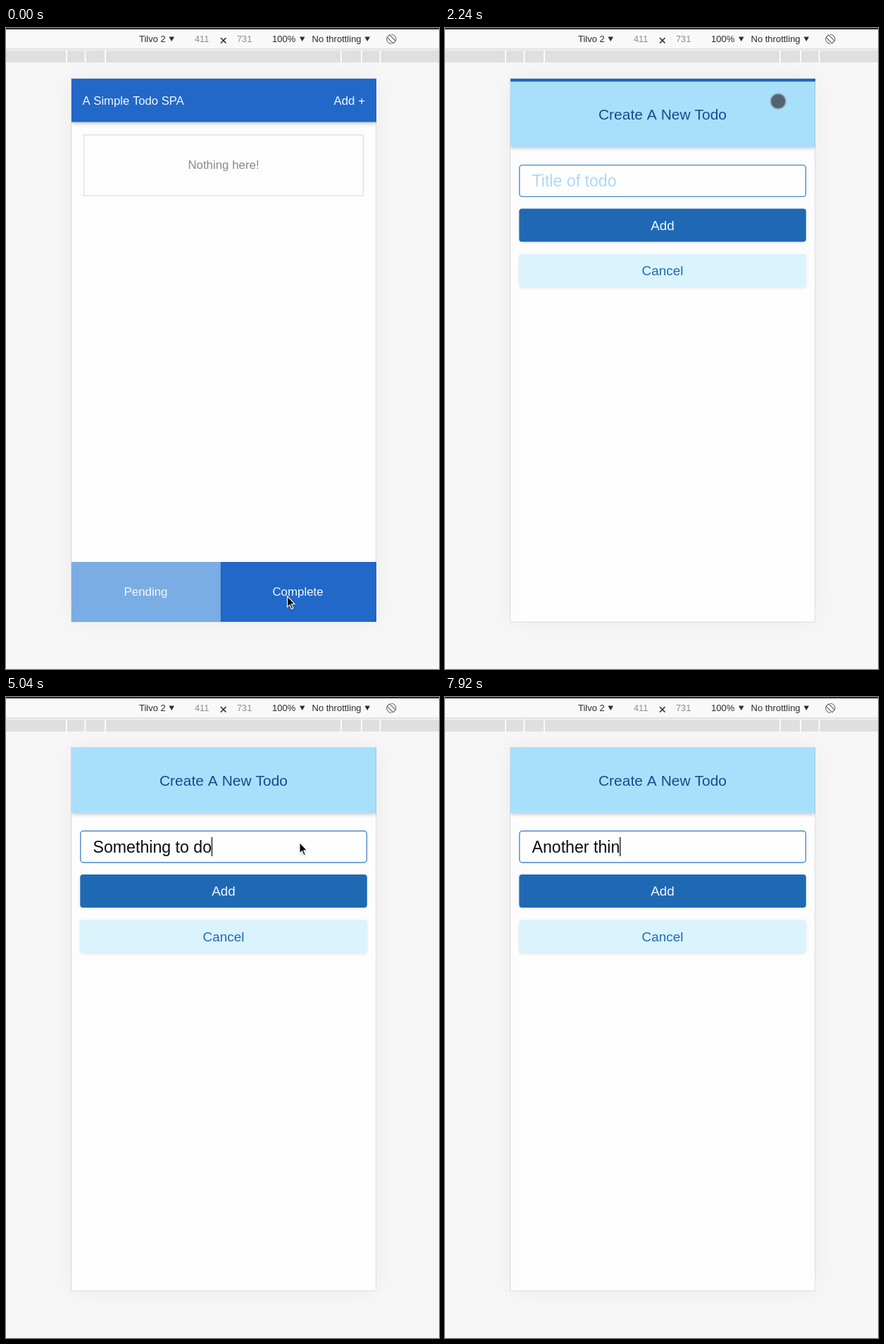
Write an HTML page with a canvas that moves like this. It is 615 px wide and 910 px high and loops after 8 s.

```html
<!DOCTYPE html>
<html lang="en">
<head>
<meta charset="utf-8">
<title>Todo app</title>
<style>
  html, body { margin: 0; width: 100%; height: 100%; overflow: hidden; background: #f7f7f7; }
  canvas { display: block; width: 615px; height: 910px; }
</style>
</head>
<body>
<canvas id="stage" width="615" height="910"></canvas>
<script>
const ctx = document.getElementById('stage').getContext('2d');
const LOOP = 8000, STEP = 80, SLIDE = 300;
const PHONE = { x: 93, y: 72, w: 433, h: 771 };
const BLUE = '#2168c8', FONT = '"Liberation Sans", Arial, sans-serif';

// CSS "ease" curve, solved by bisection
function ease(x) {
  if (x <= 0) return 0;
  if (x >= 1) return 1;
  const bez = (a, b, u) => 3 * a * u * (1 - u) ** 2 + 3 * b * u * u * (1 - u) + u ** 3;
  let lo = 0, hi = 1;
  for (let i = 0; i < 24; i++) {
    const mid = (lo + hi) / 2;
    if (bez(0.25, 0.25, mid) < x) lo = mid; else hi = mid;
  }
  return bez(0.1, 1, lo);
}
const slide = (t, start) => ease((t - start) / SLIDE);

// Key moments
const toComplete = 365, toPending = 1279;
const open1 = 1970, close1 = 5245, open2 = 6120;

const TYPED = [
  { text: 'Something to do', ready: open1 + SLIDE,
    when: i => i < 7 ? [3200, 3360, 3520, 3600, 3760, 3840, 3840][i] : 4000 + (i - 7) * 80 },
  { text: 'Another thin', ready: open2 + SLIDE,
    when: i => i ? 7120 + (i - 1) * 80 : 6880 }
];

// Pointer path: time, x, y
const PATH = [
  [360, 399.5, 806.5], [680, 300, 800], [1040, 205, 792], [1200, 212, 786],
  [1360, 325.5, 673], [1520, 490, 430], [1680, 569, 210], [1840, 530, 125],
  [2000, 473, 103], [4800, 473, 103], [5000, 425, 190], [5200, 385, 272],
  [5360, 385, 272], [5600, 425, 190], [5840, 472, 120], [6000, 487, 102.5]
];
const PRESSES = [[2000, 3120], [5200, 5360], [6080, 6800]];
const HIDDEN = [[3200, 4880], [6880, LOOP]];
const during = (spans, t) => spans.some(([a, b]) => t >= a && t < b);

function pointerAt(t) {
  let i = PATH.findIndex(p => p[0] > t);
  if (i < 0) i = PATH.length;
  if (i === 0) return PATH[0].slice(1);
  const a = PATH[i - 1], b = PATH[i] || a;
  const k = b === a ? 0 : (t - a[0]) / (b[0] - a[0]);
  return [a[1] + (b[1] - a[1]) * k, a[2] + (b[2] - a[2]) * k];
}

function rect(x, y, w, h, color) {
  ctx.fillStyle = color;
  ctx.fillRect(x, y, w, h);
}
function label(text, x, y, size, color, align = 'left') {
  ctx.font = `${size}px ${FONT}`;
  ctx.textAlign = align;
  ctx.fillStyle = color;
  ctx.fillText(text, x, y);
}
function shape(points, color) {
  ctx.beginPath();
  points.forEach(([x, y]) => ctx.lineTo(x, y));
  ctx.closePath();
  ctx.fillStyle = color;
  ctx.fill();
}
function rounded(x, y, w, h, r, fill, stroke) {
  ctx.beginPath();
  ctx.roundRect(x, y, w, h, r);
  if (fill) { ctx.fillStyle = fill; ctx.fill(); }
  if (stroke) { ctx.strokeStyle = stroke; ctx.lineWidth = 1.4; ctx.stroke(); }
}
function shadowed(blur, dy, alpha, draw) {
  ctx.save();
  ctx.shadowColor = `rgba(0,0,0,${alpha})`;
  ctx.shadowBlur = blur;
  ctx.shadowOffsetY = dy;
  draw();
  ctx.restore();
}

function drawToolbar() {
  rect(0, 0, 615, 30, '#f9f9f9');
  rect(0, 0, 615, 2, '#2b272a');
  rect(0, 29.5, 615, 1, '#cbcbcb');
  rect(0, 32, 615, 17, '#dfdfdf');
  for (const x of [86, 112.5, 141, 476, 505, 531.5]) rect(x - 1, 32, 2, 17, '#fbfbfb');
  const ink = '#2c2c2c', gray = '#8e8e8e';
  label('Tilvo 2', 189, 20, 13, ink);
  label('411', 268, 20, 12.8, gray);
  label('731', 328, 20, 12.8, gray);
  label('100%', 378, 20, 13, ink);
  label('No throttling', 434.5, 20, 13, ink);
  for (const x of [231.5, 417, 509.5]) shape([[x, 12.5], [x + 7.5, 12.5], [x + 3.75, 19]], ink);
  ctx.strokeStyle = ink;
  ctx.lineWidth = 1.6;
  ctx.beginPath();
  ctx.moveTo(305, 14); ctx.lineTo(312.5, 21.5);
  ctx.moveTo(312.5, 14); ctx.lineTo(305, 21.5);
  ctx.stroke();
  // rotate icon
  ctx.save();
  ctx.translate(547.3, 15.8);
  ctx.lineWidth = 1;
  ctx.strokeStyle = '#555';
  for (const from of [-1.6, 1.54]) {
    ctx.beginPath();
    ctx.arc(0, 0, 6.6, from, from + 1.9);
    ctx.stroke();
  }
  ctx.rotate(-Math.PI / 4);
  ctx.strokeRect(-2.5, -6, 5, 12);
  ctx.restore();
}

function drawEmpty(dx) {
  ctx.strokeStyle = '#e5e5e5';
  ctx.lineWidth = 1.7;
  ctx.strokeRect(110.5 + dx, 151.8, 397, 86.2);
  label('Nothing here!', 309 + dx, 200, 16.86, '#8a8a8a', 'center');
}

function drawApp(t) {
  const page = slide(t, toComplete) - slide(t, toPending);
  const complete = t >= toComplete && t < 1200;
  if (t >= close1) {
    rect(93, 134, 433, 84, '#fdfbe0');
    rect(93, 217, 433, 1.7, '#f3ebb4');
    label('Something to do', 108.5, 181, 16.86, '#000');
  } else {
    if (page < 1) drawEmpty(-page * 433);
    if (page > 0) drawEmpty((1 - page) * 433);
  }
  shadowed(5, 2, 0.2, () => rect(93, 72, 433, 61.5, BLUE));
  label('A Simple Todo SPA', 108.5, 108.5, 16.7, '#f4f8ff');
  label('Add +', 510, 108.5, 16.86, '#f4f8ff', 'right');
  const light = '#7aade3';
  rect(93, 758, 211.5, 85, complete ? BLUE : light);
  rect(304.5, 758, 221.5, 85, complete ? light : BLUE);
  label('Pending', 198.5, 805.8, 16.86, '#f4f8ff', 'center');
  label('Complete', 414.5, 805.8, 16.86, '#f4f8ff', 'center');
}

function drawInput(t) {
  const { text, ready, when } = TYPED[t < open2 ? 0 : 1];
  let n = 0;
  while (n < text.length && when(n) <= t) n++;
  const value = text.slice(0, n);
  if (n) label(value, 123.5, 148.5, 23.15, '#0c0c0c');
  else label('Title of todo', 123.5, 148.5, 23.15, '#aed8f5');
  const since = t - (n ? when(n - 1) : ready);
  if (since >= 0 && since % 1000 < 500) {
    ctx.font = `23.15px ${FONT}`;
    rect(123.3 + ctx.measureText(value).width, 127, 1.3, 27, '#111');
  }
}

function drawSheet(t) {
  const up = slide(t, open1) - slide(t, close1) + slide(t, open2);
  if (up <= 0) return;
  ctx.save();
  ctx.translate(0, 843 - up * 771);
  rect(93, 0, 433, 772, '#fdfdfd');
  shadowed(5, 2, 0.2, () => rect(93, 0, 433, 92.5, '#a8e0fc'));
  label('Create A New Todo', 309, 53.5, 21, '#184b8f', 'center');
  rounded(105.8, 118.2, 406.6, 44.8, 4, '#fefefe', '#4a8ac6');
  drawInput(t);
  shadowed(4, 1, 0.1, () => rounded(105.3, 180, 407.5, 47, 4, '#1f69b4'));
  label('Add', 309, 210.3, 18.9, '#f0f7ff', 'center');
  shadowed(4, 1, 0.1, () => rounded(105.3, 244.5, 407.5, 47, 4, '#dbf3fd'));
  label('Cancel', 309, 274.5, 18.9, '#1f69b4', 'center');
  ctx.restore();
}

function drawPointer(t) {
  if (during(HIDDEN, t)) return;
  const [x, y] = pointerAt(t);
  if (during(PRESSES, t)) {
    ctx.beginPath();
    ctx.arc(x + 0.2, y + 1, 11, 0, Math.PI * 2);
    ctx.fillStyle = 'rgba(38,42,50,.68)';
    ctx.fill();
    ctx.strokeStyle = 'rgba(165,180,200,.85)';
    ctx.lineWidth = 1.8;
    ctx.stroke();
    return;
  }
  ctx.save();
  ctx.translate(x, y);
  const arrow = [[0, 0], [0, 15.5], [3.5, 12.4], [6, 18.3], [8.4, 17.3], [5.9, 11.5], [10.5, 11.2]];
  shadowed(3, 1, 0.35, () => shape(arrow, '#000'));
  ctx.strokeStyle = '#fff';
  ctx.lineWidth = 1.2;
  ctx.stroke();
  ctx.restore();
}

function draw(t) {
  rect(0, 0, 615, 910, '#f7f7f7');
  drawToolbar();
  const { x, y, w, h } = PHONE;
  shadowed(32, 0, 0.055, () => rect(x, y, w, h, '#fdfdfd'));
  ctx.save();
  ctx.beginPath();
  ctx.rect(x, y, w, h);
  ctx.clip();
  drawApp(t);
  drawSheet(t);
  ctx.restore();
  ctx.strokeStyle = 'rgba(0,0,0,.11)';
  ctx.lineWidth = 1;
  ctx.strokeRect(x - 0.5, y - 0.5, w, h + 0.5);
  drawPointer(t);
}

const began = performance.now();
function tick() {
  const t = (performance.now() - began) % LOOP;
  draw(Math.floor(t / STEP) * STEP);
  requestAnimationFrame(tick);
}
tick();
</script>
</body>
</html>
```
